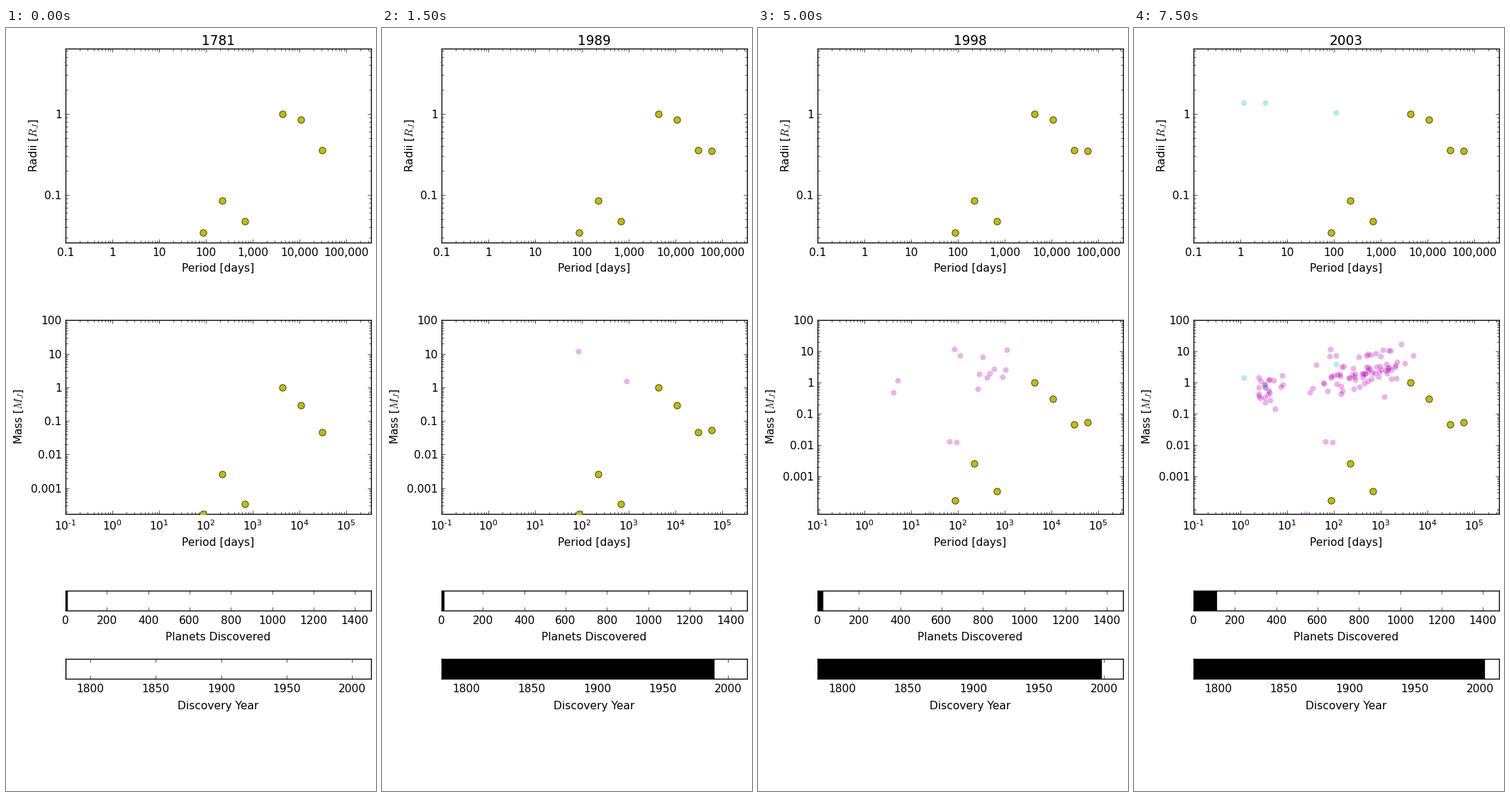
Animation of 522x1074 px, one loop 8000 ms. Source, as a matplotlib script:

```python
import numpy as np
import matplotlib.pyplot as plt
from matplotlib.animation import FuncAnimation
from matplotlib.patches import Rectangle
from matplotlib.ticker import FixedLocator, FuncFormatter, LogLocator, NullFormatter

W, H, DPI = 522, 1074, 96
LEFT, RIGHT = 84.02, 514.5
MIDDLE = (LEFT + RIGHT) / 2
FIRST_YEAR = 1781
YEARS = [FIRST_YEAR, 1846, 1988, 1989, *range(1992, 2004)]
MAGENTA, CYAN, YELLOW = (.75, 0, .75), (0, .75, .75), (.75, .75, 0)

plt.style.use("classic")
plt.rcParams.update({
    "font.family": "DejaVu Sans", "font.size": 11.6,
    "figure.facecolor": "white", "savefig.facecolor": "white",
    "ytick.alignment": "center_baseline",
    "xtick.major.pad": 5, "ytick.major.pad": 4,
})

# period [days], mass and radius [Jupiter = 1]
SOLAR = np.array([
    (88, 1.75e-4, .0341), (224.7, .00257, .0847), (687, 3.38e-4, .0475),
    (4333, 1, 1), (10759, .299, .843), (30685, .0457, .358),
    (60189, .054, .346),
])

# the first exoplanets: year, period, mass
PIONEERS = [
    (1988, 889, 1.58), (1989, 83, 12), (1992, 65, .0135), (1992, 25, 6.3e-5),
    (1993, 585, 2.8), (1994, 95, .0125), (1995, 4.2, .48), (1996, 113, 7.6),
    (1996, 1050, 2.65),
]

# transiting planets: year, period, mass, radius
TRANSITS = np.array([
    (2000, 3.45, .71, 1.37), (2001, 110, 4.05, 1.03), (2003, 1.19, 1.44, 1.37),
])


def survey(first, finds, seed=7):
    """Random yearly finds: some hot Jupiters, most on long orbits."""
    rng = np.random.default_rng(seed)
    year = np.repeat(np.arange(first, first + len(finds)), finds)
    n = len(year)
    hot = rng.random(n) < .22
    period = np.where(hot, rng.normal(.62, .17, n), rng.normal(2.7, .55, n))
    mass = -.4 + .28 * period + rng.normal(0, .35, n)
    return np.column_stack([year, 10 ** np.clip(period, .4, 3.7),
                            10 ** np.clip(mass, -1, 1.25)])


PLANETS = np.vstack([PIONEERS, survey(1997, [5, 2, 6, 18, 12, 25, 22])])

fig = plt.figure(figsize=(W / DPI, H / DPI), dpi=DPI)


def panel(top, bottom):
    return fig.add_axes([LEFT / W, 1 - bottom / H,
                         (RIGHT - LEFT) / W, (bottom - top) / H])


def label(x, y, text, **kw):
    return fig.text(x / W, 1 - y / H, text, ha="center", va="baseline",
                    rotation_mode="anchor", **kw)


def log_axis(axis, low, high, formatter):
    axis.set_major_locator(FixedLocator([10.0 ** n for n in range(low, high + 1)]))
    axis.set_minor_locator(LogLocator(subs=range(2, 10), numticks=100))
    axis.set_major_formatter(formatter)
    axis.set_minor_formatter(NullFormatter())


def log_panel(top, bottom, y_low, y_high, x_formatter):
    ax = panel(top, bottom)
    ax.set_xscale("log")
    ax.set_yscale("log")
    ax.set_xlim(.1, 10 ** 5.525)
    log_axis(ax.xaxis, -1, 5, x_formatter)
    log_axis(ax.yaxis, y_low, y_high, plain)
    return ax


def dots(ax, color):
    return ax.plot([], [], "o", color=color, alpha=.3, ms=6, mew=0, zorder=2)[0]


def suns(ax):
    return ax.plot([], [], "o", color=YELLOW, mec="k", mew=.5, ms=7, zorder=3)[0]


def gauge(top, bottom, low, high, ticks):
    ax = panel(top, bottom)
    ax.set_xlim(low, high)
    ax.set_ylim(0, 1)
    ax.set_xticks(ticks)
    ax.set_yticks([])
    return ax.add_patch(Rectangle((low, 0), 0, 1, fc="k", ec="k", lw=1))


def power(value, _):
    exponent = str(round(np.log10(value))).replace("-", "\u2010")
    return rf"$\mathregular{{10^{{{exponent}}}}}$"


plain = FuncFormatter(lambda v, _: f"{v:,g}")

radius_ax = log_panel(29.4, 302.4, -1, 0, plain)
radius_ax.set_ylim(10 ** -1.592, 10 ** .802)
mass_ax = log_panel(411.4, 684.3, -3, 2, FuncFormatter(power))

mass_dots = dots(mass_ax, MAGENTA)
mass_transits = dots(mass_ax, CYAN)
radius_transits = dots(radius_ax, CYAN)
mass_suns, radius_suns = suns(mass_ax), suns(radius_ax)

count_bar = gauge(792.4, 820.4, 0, 1476, range(0, 1401, 200))
year_bar = gauge(888.4, 916.4, FIRST_YEAR, 2014.35, range(1800, 2001, 50))

title = label(MIDDLE, 23.8, "", fontsize=13.92)
label(MIDDLE, 343.5, "Period [days]")
label(MIDDLE, 729.3, "Period [days]")
label(MIDDLE, 862.5, "Planets Discovered")
label(MIDDLE, 958.8, "Discovery Year")
label(44, 165.5, "Radii [$R_J$]", rotation=90)
label(23.3, 547, "Mass [$M_J$]", rotation=90)


def draw(i):
    year = YEARS[i]
    title.set_text(str(year))

    solar = SOLAR if year >= 1846 else SOLAR[:-1]
    mass_suns.set_data(solar[:, 0], solar[:, 1])
    radius_suns.set_data(solar[:, 0], solar[:, 2])

    seen = PLANETS[PLANETS[:, 0] <= year]
    mass_dots.set_data(seen[:, 1], seen[:, 2])

    transits = TRANSITS[TRANSITS[:, 0] <= year]
    mass_transits.set_data(transits[:, 1], transits[:, 2])
    radius_transits.set_data(transits[:, 1], transits[:, 3])

    # the first pulsar planets widen the mass range
    mass_ax.set_ylim(10 ** (-4.207 if year >= 1992 else -3.773), 100)

    # Earth is counted but not plotted
    count_bar.set_width(1 + len(solar) + len(seen) + len(transits))
    year_bar.set_width(year - FIRST_YEAR)
    return []


anim = FuncAnimation(fig, draw, frames=len(YEARS), interval=500, repeat=True,
                     init_func=lambda: draw(0))
plt.show()
```
